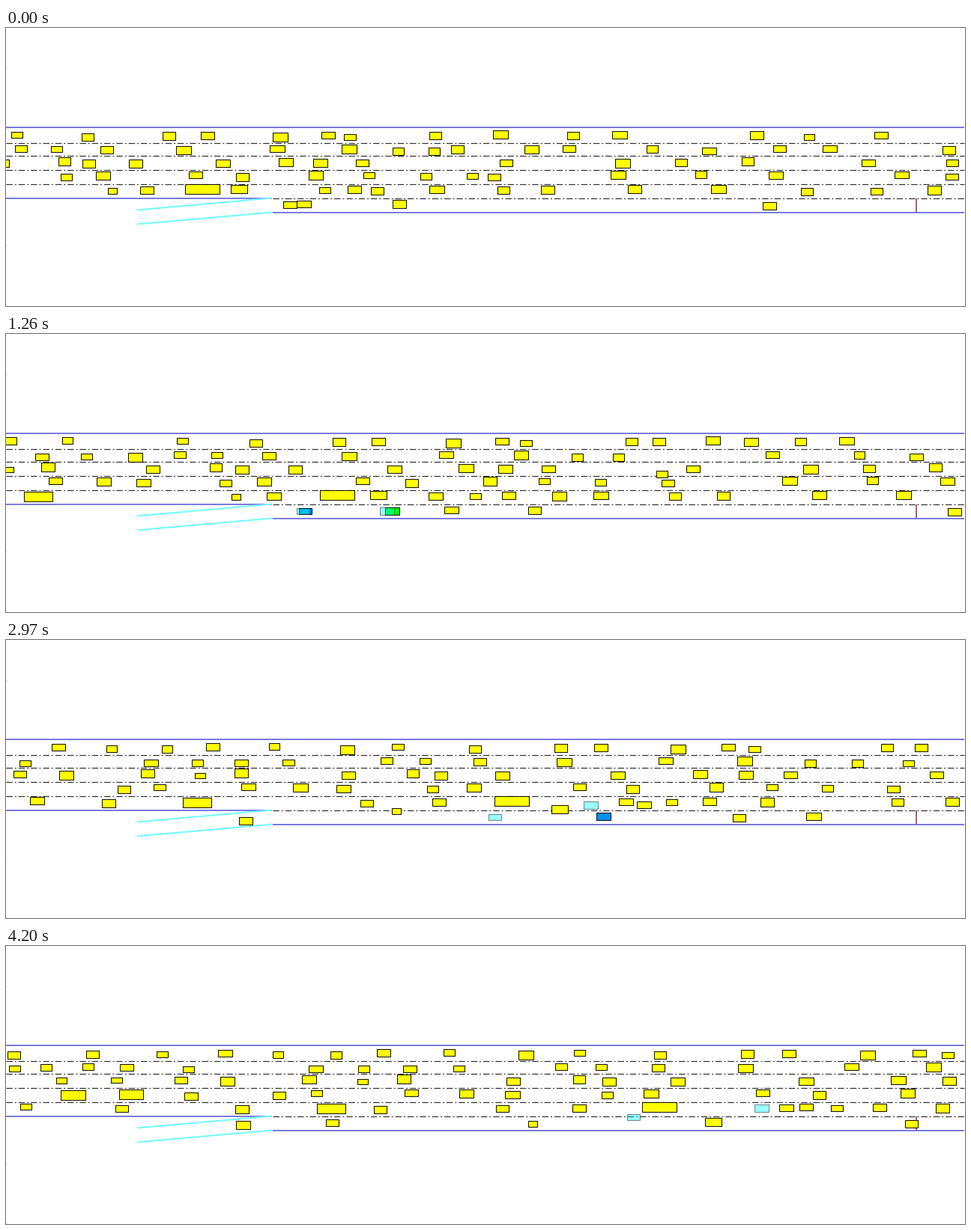
A matplotlib script that plays this animation: 1280 px wide and 372 px high, repeating every 4.23 s.

```python
import math
import random
import numpy as np
import matplotlib.pyplot as plt
from matplotlib.animation import FuncAnimation
from matplotlib.collections import PolyCollection

W, H, DPI = 1280, 372, 100
STEP, COUNT = 30, 141
PX = 72 / DPI
EXIT_X = 1277
MID = 1950  # every car is placed by its x at this time

YELLOW = (1, 1, 0, 1)
BLUE = (0, 0.56, 0.94, 1)
GREEN = (0, 1, 0, 1)
GHOST = (0, 1, 1, 0.4)

LANE_Y = {1: 144.5, 2: 163, 3: 180, 4: 198, 5: 217, 6: 237}
RAMP_END, RAMP_SLOPE = 356, 0.089

# How far a car travels in one unit of flow, by lane and place on the road
KNOTS = (0, 400, 800, 1200)
PACE = {1: (300, 332, 345, 450), 2: (295, 318, 340, 410), 3: (290, 300, 368, 372),
        4: (278, 315, 348, 340), 5: (240, 245, 310, 366)}
PACE[6] = PACE[5]

rng = random.Random(11)


def flow(t):
    """Shared clock: traffic slows down, then speeds up again."""
    def swing(s):
        return math.sin(math.tau * (s - 1600) / 5000)
    return 0.000555 * (t - MID) - 0.0517 * (swing(t) - swing(MID))


def ease(s):
    s = min(max(s, 0), 1)
    return s * s * (3 - 2 * s)


class Car:
    def __init__(self, lane, x, w=None, h=None, to=None, at=0, dur=1200,
                 born=0, end=math.inf, path=None, paint=lambda t: YELLOW):
        self.w = w or rng.uniform(14, 20)
        self.h = h or 0.42 * self.w + rng.uniform(1.2, 3.8)
        self.shift = 0 if path else rng.uniform(-2, 2)
        self.lane, self.to, self.at, self.dur = lane, to or lane, at, dur
        self.born, self.end, self.paint = born, end, paint
        pace = np.interp(x, KNOTS, PACE[self.to])
        self.go = path or (lambda t: x + pace * flow(t))

    def box(self, t):
        if not self.born <= t < self.end:
            return None
        x = self.go(t)
        a, b = x - self.w / 2, x + self.w / 2
        if b < 0 or b > EXIT_X:
            return None
        k = ease((t - self.at) / self.dur + 0.5)
        y = LANE_Y[self.lane] * (1 - k) + LANE_Y[self.to] * k + self.shift
        if 6 in (self.lane, self.to):
            y += RAMP_SLOPE * max(0, RAMP_END - x) * (self.born > 0)
        c, d = y - self.h / 2, y + self.h / 2
        return [(a, c), (b, c), (b, d), (a, d)]


def curve(t, x):
    """Parabola through three moments."""
    p = np.polyfit(t, x, 2)
    return lambda s: np.polyval(p, s)


ROWS = {
    1: (-373, -268, -175, -91, -20, 52, 110, 189, 347, 447, 559, 612, 713, 779, 812,
        967, 1086, 1213, 1275, 1458, 1528, 1624),
    2: (-365, -323, -267, -216, -133, 34, 94, 151, 212, 339, 389, 460, 569, 701, 803,
        883, 941, 1160, 1278, 1354, 1448, 1515, 1674),
    3: (-380, -296, -223, -137, -75, 33, 102, 156, 297, 382, 418, 493, 634, 735, 791,
        849, 1043, 1200, 1278, 1367, 1528, 1640),
    4: (8, 53, 166, 232, 287, 400, 453, 588, 656, 763, 836, 911, 1000, 1162, 1272,
        1372, 1540, 1607),
    5: (-280, -152, 8, 443, 728, 775, 1008, 1076, 1210, 1322, 1440, 1533, 1610),
    6: (1390,),
}
cars = [Car(lane, x) for lane, row in ROWS.items() for x in row]

# trucks
cars += [Car(4, -266, 33, 13), Car(4, -188, 32, 13),
         Car(5, 125, 38, 13), Car(5, 532, 46, 13)]

# lane changes
cars += [
    Car(2, 282, to=1, at=2500),
    Car(2, 1007, to=1, at=720),
    Car(2, 1142, to=1, at=800),
    Car(4, 1003, to=2, at=1700, dur=3400),
    Car(5, -108, to=4, at=4000),
    Car(5, 390, 12, 8, to=6, at=2950),
    Car(5, 591, 22, 11, to=6, at=2900),
    Car(6, 672, to=5, at=800),
    Car(6, 694, to=5, at=2600, dur=2000),
    Car(5, 811, to=6, at=900),
    Car(6, 846, to=5, at=400),
    Car(5, 904, to=6, at=2200),
]

# arrivals on the ramp
cars += [
    Car(6, 350, to=5, at=2500, born=1650),
    Car(6, 190, to=5, at=3700, born=2600),
    Car(6, 127, born=3750),
    Car(6, 10, born=3830),
]

# two merging cars, each with a pale twin
cars += [
    Car(6, 0, 19, 10, to=5, at=3400, born=30, end=3780,
        path=curve((720, 1950, 3420), (439, 622, 882)),
        paint=lambda t: GREEN if t < 1600 else BLUE),
    Car(6, 0, 17, 8, to=5, at=2350, dur=1500, born=330, end=2900,
        path=curve((720, 1950, 2490), (316, 491, 551)),
        paint=lambda t: BLUE if t < 1600 else GREEN),
    Car(6, 0, 19, 10, to=5, at=2600, dur=1800, born=30,
        path=curve((720, 1950, 4200), (434, 612, 1009)), paint=lambda t: GHOST),
    Car(6, 0, 17, 8, to=5, at=4300, born=330,
        path=curve((720, 1950, 4200), (316, 500, 838)), paint=lambda t: GHOST),
]

fig = plt.figure(figsize=(W / DPI, H / DPI), dpi=DPI, facecolor="white")
ax = fig.add_axes([0, 0, 1, 1])
ax.set_xlim(0, W)
ax.set_ylim(H, 0)
ax.axis("off")


def line(x0, y0, x1, y1, color, width=1.4, style="-"):
    ax.plot([x0, x1], [y0, y1], color=color, lw=width * PX, ls=style,
            solid_capstyle="butt", dash_capstyle="butt", zorder=1)


ROAD, RAMP = "#5a5ad8", "#70ffff"
DASHDOT = (0, (7, 2.5, 1.6, 2.5))
for y in (153.5, 170.5, 189.5, 208.5):
    line(0, y, 1279, y, "#303030", 1.2, DASHDOT)
line(RAMP_END, 227.5, 1279, 227.5, "#303030", 1.2, DASHDOT)
line(0, 132.5, 1279, 132.5, ROAD, 1.6)
line(0, 227.5, 355, 227.5, ROAD, 1.6)
line(RAMP_END, 246.5, 1279, 246.5, ROAD, 1.6)
line(175, 243.5, 355, 227.5, RAMP, 2)
line(175, 262.5, RAMP_END, 246.5, RAMP, 2)
line(1214.5, 228, 1214.5, 246, "#a03848", 1.6)
line(1279.5, 0, 1279.5, H, "#e4e4e4", 1)
for y in (53.5, 290.5, 370.5):
    line(0, y, 1, y, "#c8c8c8", 1)

boxes = PolyCollection([], linewidths=1.1 * PX, zorder=2)
ax.add_collection(boxes, autolim=False)


def draw(i):
    t = i * STEP
    seen = [(c.box(t), c.paint(t)) for c in cars]
    seen = [s for s in seen if s[0]]
    boxes.set_verts([s[0] for s in seen])
    boxes.set_facecolor([s[1] for s in seen])
    boxes.set_edgecolor([(0, 0, 0, 0.45 if s[1] == GHOST else 0.9) for s in seen])
    return [boxes]


anim = FuncAnimation(fig, draw, frames=COUNT, interval=STEP, repeat=True,
                     repeat_delay=0, blit=False)
plt.show()
```
